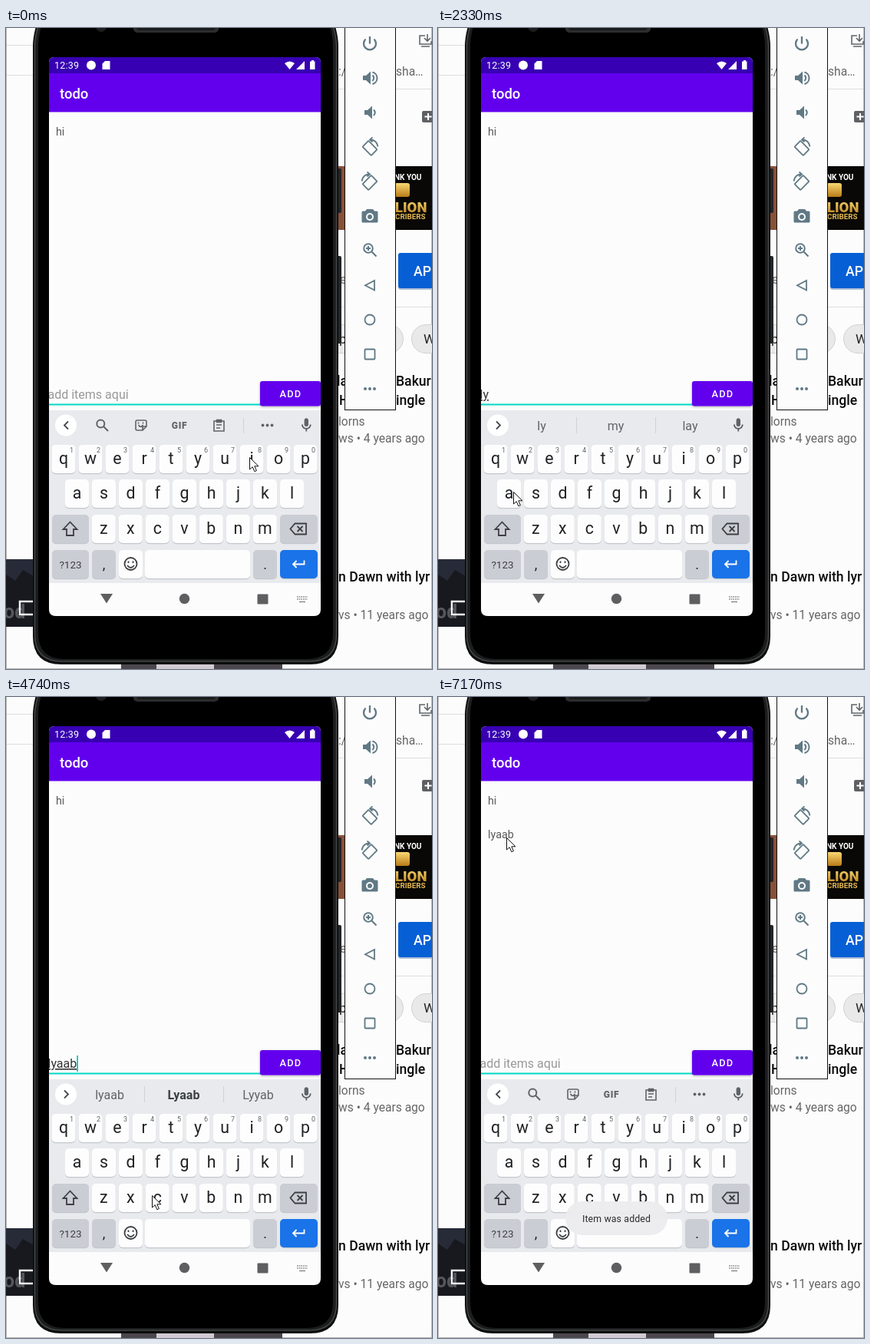
Recreate the animation shown at these times as an HTML page. Size 555x835 px, loop 8 s.

```html
<!DOCTYPE html>
<html lang="en">
<head>
<meta charset="utf-8">
<title>Todo app demo</title>
<style>
html, body { margin: 0; width: 100%; height: 100%; overflow: hidden; background: #fcfcfc; }
svg { display: block; width: 555px; height: 835px; font-family: Roboto, sans-serif; }
.mid { text-anchor: middle; }
.med { font-weight: 500; }
.grey { fill: #666; font-size: 15.6px; }
.title { fill: #0a0a0a; font-size: 17.6px; font-weight: 500; }
.line { fill: none; stroke: currentColor; stroke-width: 2; }
.tools { color: #607985; fill: #607985; }
.strip { color: #5f6368; fill: #5f6368; }
.item { fill: #5a5a5a; font-size: 14.3px; }
</style>
</head>
<body>
<svg viewBox="0 0 555 835">
  <defs>
    <clipPath id="screen"><path d="M56 45q0-7 7-7h340q7 0 7 7v712q0 9-9 9H65q-9 0-9-9z"/></clipPath>
    <linearGradient id="gold" x2="0" y2="1"><stop stop-color="#f8d873"/><stop offset="1" stop-color="#b97c18"/></linearGradient>
    <filter id="soft" x="-30%" y="-30%" width="160%" height="160%"><feDropShadow dx="0" dy="1" stdDeviation="1.5" flood-opacity=".35"/></filter>
  </defs>

  <!-- web page behind the phone -->
  <rect width="555" height="835" fill="#fcfcfc"/>
  <path d="M0 22.5H40M0 61.5H40M430 79.5H555M430 363.5H555" stroke="#dedede"/>
  <path d="M.5 0V835M554.5 0V835M0 834.5H555" stroke="#b5b5b5"/>
  <g fill="none" stroke="#606468" stroke-width="1.6">
    <path d="M546 10h-7v11h15v-4M541 24h11M549 8v9m-4-4l4 4 4-4"/>
  </g>
  <text x="433" y="62" class="grey">:/</text>
  <text x="508" y="62" class="grey">sha…</text>
  <rect x="542" y="108" width="18" height="15" rx="2" fill="#5f6063"/>
  <path d="M550 111v9m-4.500-4.500h9" stroke="#fff" stroke-width="2"/>
  <rect x="430" y="180" width="125" height="83" fill="#090806"/>
  <path d="M430 180h12v83h-12z" fill="#875039"/>
  <g font-weight="700" fill="#fff">
    <text x="506" y="198" font-size="10">NK YOU</text>
    <rect x="506" y="202" width="20" height="18" rx="3" fill="url(#gold)"/>
    <text x="507" y="240" font-size="18.500" font-weight="900" fill="url(#gold)">LION</text>
    <text x="507" y="249" font-size="9.800" fill="#e6b951">CRIBERS</text>
  </g>
  <rect x="511" y="294" width="60" height="47" rx="3" fill="#aebfd8"/>
  <rect x="511" y="293" width="60" height="46" rx="3" fill="#065fd4"/>
  <text x="531" y="323" font-size="17.600" fill="#fff" class="med">AP</text>
  <text x="435" y="333" class="grey">e</text>
  <g fill="#e9e9e9" stroke="#d2d2d2">
    <rect x="400.500" y="386.500" width="117" height="37" rx="18.500"/>
    <rect x="528.500" y="386.500" width="80" height="37" rx="18.500"/>
  </g>
  <text x="434" y="411" font-size="17" fill="#222">p</text>
  <text x="544" y="411" font-size="17" fill="#222">W</text>
  <g class="title">
    <text x="431" y="466">la</text><text x="508" y="466">Bakur</text>
    <text x="434" y="491">H</text><text x="508" y="491">ingle</text>
    <text x="433" y="721">n Dawn with lyr</text>
  </g>
  <g class="grey">
    <text x="433" y="518">lorns</text>
    <text x="433" y="540">ws • 4 years ago</text>
    <text x="433" y="770">vs • 11 years ago</text>
  </g>
  <rect y="692" width="60" height="88" fill="#17191f"/>
  <path d="M0 692h36v22l-14-8-10 14L0 712z" fill="#272b38"/>
  <text x="-3" y="769" font-size="25" font-weight="700" fill="#55575d">od</text>
  <path d="M40 747H18v17h22" fill="none" stroke="#f4f4f4" stroke-width="2.500"/>
  <path d="M150 826h210v9H150z" fill="#4b474c"/>
  <path d="M196 826h75v9h-75z" fill="#d2cad3"/>

  <!-- phone -->
  <g fill="#242526"><rect x="431" y="183" width="6" height="58" rx="2"/><rect x="431" y="297" width="6" height="114" rx="2"/></g>
  <path d="M35 24Q35 10 41-9H427Q433 10 433 24V792q0 37-37 37H72q-37 0-37-37z" fill="#0b0c0c"/>
  <path d="M37.500 24Q37.500 10 44-9H424Q430.500 10 430.500 24V790q0 35-35 35H72.500q-35 0-35-35z" fill="#1c1d1e" stroke="#434546" stroke-width="1.500"/>
  <path d="M42 24Q42 10 48-9H420Q426 10 426 24V788q0 34-34 34H76q-34 0-34-34z" fill="#000"/>
  <rect x="166" y="-8" width="111" height="14" rx="5" fill="#2b2c2e"/>
  <rect x="170" y="-8" width="103" height="11" rx="4" fill="#191a1b"/>
  <circle cx="124" cy="-2" r="7" fill="#1d1e20"/>

  <g clip-path="url(#screen)">
    <rect x="56" y="38" width="354" height="730" fill="#fcfcfc"/>
    <rect x="56" y="38" width="354" height="22" fill="#3700b3"/>
    <rect x="56" y="59" width="354" height="50.500" fill="#6200ee"/>
    <g fill="#fff">
      <text x="63" y="53" font-size="12.500" letter-spacing=".2">12:39</text>
      <circle cx="111" cy="48.500" r="6"/>
      <path d="M129 43h6.500v11h-10v-7.500z"/>
      <path d="M363 46q6.500-5 13 0l-6.500 8zM389 43v11h-11z"/>
      <path d="M397 43.500h1v-1.500h3v1.500h1.500V54H396V43.500z"/>
      <text x="70" y="92" font-size="18.500" class="med">todo</text>
    </g>
    <text x="65" y="140" class="item">hi</text>
    <text x="65" y="184" class="item" id="added">lyaab</text>

    <path d="M56 490.500H332" stroke="#03dac5" stroke-width="2"/>
    <text x="54.500" y="483" font-size="16" fill="#999" id="hint">add items aqui</text>
    <text x="54.500" y="483" font-size="16" fill="#333" id="typed" text-decoration="underline"></text>
    <rect y="467" width="1.700" height="21" fill="#03c4b2" id="caret"/>
    <rect x="331" y="460" width="79" height="32.500" rx="3" fill="#6200ee" filter="url(#soft)"/>
    <text x="371" y="481" font-size="12.800" letter-spacing="1.200" fill="#fff" class="mid med">ADD</text>

    <rect x="56" y="498" width="354" height="225" fill="#e8eaee"/>
    <circle cx="78" cy="517.500" r="14" fill="#fff"/>
    <path id="arrow" fill="none" stroke="#45484d" stroke-width="1.800"/>
    <g class="strip">
      <g id="icons">
        <g class="line"><circle cx="123.300" cy="515.500" r="5"/><path d="M127 519l6 6"/></g>
        <g class="line" style="stroke-width:1.6">
          <path d="M171 511h10q2 0 2 2v6l-5 5h-7q-2 0-2-2v-9q0-2 2-2zM183 519h-3q-2 0-2 2v3M172.500 517q3 5 6 0"/>
          <path d="M172.500 513.500v2m6-2v2"/>
          <path d="M271 512h13v13h-13zM274.500 510.500h6v3h-6zM274 517h7m-7 4h5"/>
        </g>
        <text x="226" y="521.500" class="mid" font-size="12" font-weight="900" letter-spacing=".7">GIF</text>
        <path d="M309.500 508v20" stroke="#d0d2d7"/>
        <circle cx="334.500" cy="517.500" r="1.900"/><circle cx="340.500" cy="517.500" r="1.900"/><circle cx="346.500" cy="517.500" r="1.900"/>
      </g>
      <g id="words" class="mid" font-size="16">
        <path d="M180.500 507v21M283.500 507v21" stroke="#d0d2d7"/>
        <text x="135" y="524"></text><text x="231.500" y="524"></text><text x="328.500" y="524"></text>
      </g>
      <path transform="translate(380.500 506.500) scale(.9)" d="M12 14c1.660 0 3-1.340 3-3V5c0-1.660-1.340-3-3-3S9 3.340 9 5v6c0 1.660 1.340 3 3 3zm5-3c0 2.760-2.240 5-5 5s-5-2.240-5-5H5c0 3.530 2.610 6.430 6 6.920V21h2v-3.080c3.390-.49 6-3.390 6-6.920h-2z"/>
    </g>
    <g id="keys"></g>
    <g fill="none" stroke="#3c4043" stroke-width="1.800">
      <path d="M83.500 643.500l-9 9.500h4.500v8h9v-8h4.500z"/>
      <path d="M376.500 645.500H391v14h-14.500l-6-7zM379.500 649l7 7m0-7l-7 7"/>
      <circle cx="162.500" cy="698" r="8"/><path d="M158 700q4.500 6 9 0M159.500 694.500v2.500m6-2.500v2.500"/>
      <path d="M388.500 693.500v5H374m4.500-4.500l-4.500 4.500 4.500 4.500" stroke="#fff"/>
    </g>
    <g fill="#5f5f61">
      <path d="M123 737h16l-8 12.500z"/><circle cx="232.500" cy="743.500" r="6.700"/><rect x="327.500" y="737.500" width="14" height="13" rx="1"/>
      <path d="M379 741h14M379 744h14" stroke="#8b8b8d" stroke-width="1.700" stroke-dasharray="1.700 1"/>
      <path d="M382 747.500h8" stroke="#8b8b8d" stroke-width="1.700"/>
    </g>
    <g id="popup" filter="url(#soft)">
      <rect x="-17" y="-64" width="35" height="102" rx="5" fill="#cbcdd3"/>
      <text y="-29" class="mid" font-size="25" fill="#202124"></text>
      <text x="9" y="-18" class="mid" font-size="11" fill="#202124">…</text>
    </g>
    <rect id="bubble" x="166" y="657" width="133" height="44" rx="22" fill="#ededef"/>
    <text id="toast" x="232.500" y="683.500" class="mid" font-size="12.300" letter-spacing=".15" fill="#2c2c2c">Item was added</text>
  </g>

  <!-- emulator toolbar -->
  <rect x="441.500" y="-5" width="66" height="502.500" fill="#fcfcfc" stroke="#111"/>
  <g class="tools">
    <g class="line" style="stroke-width:2.3"><path d="M474 11v9.500M468.500 14.500a8 8 0 1 0 11 0"/></g>
    <path d="M465 62h4l6-5.500v17l-6-5.500h-4z"/>
    <g class="line"><path d="M477.500 61.500q3.500 3.500 0 7.500M477.500 57.500a8 8 0 0 1 0 15.500"/></g>
    <path d="M467 107h4l6-5.500v17l-6-5.500h-4z"/>
    <g class="line"><path d="M479 106.500q3.500 3.500 0 7.500"/></g>
    <g id="turn" class="line" style="stroke-width:1.8">
      <rect x="-8" y="-5.500" width="16" height="11" rx="1" transform="translate(474 156.500) rotate(45)"/>
      <path d="M474 145.500q9 0 10.500 9M477.500 142.500l-3.500 3 3.500 3"/>
    </g>
    <use href="#turn" transform="translate(948 45) scale(-1 1)"/>
    <path d="M470 236h8l2 2.500h3q1.500 0 1.500 1.500v12q0 1.500-1.500 1.500h-18q-1.500 0-1.500-1.500v-12q0-1.500 1.500-1.500h3z"/>
    <circle cx="474" cy="246" r="5" fill="#fcfcfc"/><circle cx="474" cy="246" r="3"/>
    <g class="line"><circle cx="472" cy="287" r="5.800"/><path d="M476.500 291.500l6 6M472 284v6m-3-3h6"/></g>
    <g class="line" style="stroke-width:1.8">
      <path d="M480 329v12.500l-12-6.200z"/><circle cx="474" cy="380" r="6.500"/><rect x="467.500" y="418.500" width="13" height="13" rx="1"/>
    </g>
    <circle cx="468" cy="470" r="2"/><circle cx="474" cy="470" r="2"/><circle cx="480" cy="470" r="2"/>
  </g>

  <path id="pointer" d="M.5.5V16l3.700-3.300 2.600 6 2.600-1.100-2.600-5.800H12z" fill="#fff" stroke="#111" stroke-linejoin="round"/>
</svg>
<script>
const LOOP = 8000;
const $ = id => document.getElementById(id);

// Keyboard
function key(x, y, w, label = '', { fill = '#fdfdfd', size = 21.3, ink = '#202124', dy = 25, hint } = {}) {
  return `<rect x="${x}" y="${y + 1.3}" width="${w}" height="37" rx="5" fill="#c3c6cc"/>
    <rect x="${x}" y="${y}" width="${w}" height="37" rx="5" fill="${fill}"/>
    <text x="${x + w / 2}" y="${y + dy}" class="mid" font-size="${size}" fill="${ink}">${label}</text>` +
    (hint ? `<text x="${x + w - 5}" y="${y + 10}" class="mid" font-size="9" fill="#5f6368">${hint}</text>` : '');
}
const row = (letters, x, y, hints = '') =>
  [...letters].map((c, i) => key(x + i * 35, y, 31, c, { hint: hints[i] })).join('');
const dark = '#cbcdd4';
$('keys').innerHTML =
  row('qwertyuiop', 59.5, 543, '1234567890') + row('asdfghjkl', 77, 588) + row('zxcvbnm', 111.8, 634) +
  key(60, 634, 48, '', { fill: dark }) + key(357, 634, 49, '', { fill: dark }) +
  key(60, 680, 48, '?123', { fill: dark, size: 13.5, ink: '#3c4043', dy: 23.5 }) +
  key(112, 680, 31, ',', { fill: dark, size: 18 }) + key(147, 680, 31) + key(181, 680, 137) +
  key(322, 680, 31, '.', { fill: dark, size: 18 }) + key(357, 680, 49, '', { fill: '#1a73e8' });

// Screen updates come in bursts: [first, last, count]
const ticks = [[570, 1490, 8], [1640, 2030, 4], [2330, 2330, 1], [2860, 3840, 7],
  [4000, 4740, 6], [5020, 6010, 8], [6130, 7170, 9]]
  .flatMap(([a, b, n]) => Array.from({ length: n }, (_, i) => Math.round(a + (b - a) * i / Math.max(1, n - 1))));

// Pointer path: [time, x, y]
const path = [[0, 317, 560], [830, 317, 560], [1490, 123, 610], [1640, 123, 606], [1900, 123, 606],
  [2030, 98, 605], [3520, 98, 605], [3840, 179, 644], [4000, 190, 650], [4740, 190, 650],
  [5586, 368, 487], [6130, 368, 487], [7170, 89, 184]];

// Typing: [time, text, suggestions, index of the bold one]
const typing = [[0, ''], [830, 'l', ['l', 'I', 'let']], [1640, 'ly', ['ly', 'my', 'lay']],
  [2860, 'lya', ['lya', 'Lya', 'Lyaab'], 1], [3500, 'lyaa', ['lyaa', 'Lyaab', "Lyaab's"], 1],
  [4400, 'lyaab', ['lyaab', 'Lyaab', 'Lyyab'], 1], [5860, '']];

// Pressed keys: [from, to, letter, x, y]
const presses = [[570, 830, 'i', 320, 543], [1640, 1770, 's', 127, 588], [2860, 3340, 'a', 92, 588],
  [3500, 3670, 'a', 92, 588], [4140, 4440, 'c', 197, 634]];

const carets = [[830, 2330], [4400, 5580]];

const show = (el, on) => el.style.display = on ? '' : 'none';
const lastBefore = (list, t) => list.filter(k => k[0] <= t).pop();
const ramp = (t, a, b) => Math.min(1, Math.max(0, (t - a) / (b - a)));

function pointerAt(t) {
  const a = lastBefore(path, t), b = path[path.indexOf(a) + 1] || a;
  const p = a === b ? 0 : (t - a[0]) / (b[0] - a[0]);
  const e = p * p * (3 - 2 * p);
  return [1, 2].map(i => a[i] + (b[i] - a[i]) * e);
}

function draw(t) {
  const [x, y] = pointerAt(t);
  $('pointer').setAttribute('transform', `translate(${Math.round(x)} ${Math.round(y - 1)})`);

  const [, text, words, bold] = lastBefore(typing, t);
  $('typed').textContent = text;
  show($('hint'), !text);
  show($('icons'), !text);
  show($('words'), text);
  $('arrow').setAttribute('d', text ? 'M76 512.500l5 5-5 5' : 'M81 512.500l-5 5 5 5');
  if (words) $('words').querySelectorAll('text').forEach((el, i) => {
    el.textContent = words[i];
    el.style.fontWeight = i === bold ? 700 : 400;
    el.style.fill = i === bold ? '#3c4043' : '';
  });
  show($('caret'), carets.some(([a, b]) => t >= a && t < b));
  $('caret').setAttribute('x', 54.5 + (text ? $('typed').getComputedTextLength() : 0));

  const press = presses.find(([a, b]) => t >= a && t < b);
  show($('popup'), press);
  if (press) {
    $('popup').setAttribute('transform', `translate(${press[3]} ${press[4]})`);
    $('popup').querySelector('text').textContent = press[2];
  }

  show($('added'), t >= 5860);
  $('toast').style.opacity = ramp(t, 5940, 6280);
  $('bubble').style.opacity = ramp(t, 6080, 6400) * .95;
}

let shown = -1;
function frame(now) {
  const t = now % LOOP;
  const tick = ticks.filter(k => k <= t).pop() || 0;
  if (tick !== shown) draw(shown = tick);
  requestAnimationFrame(frame);
}
draw(0);
requestAnimationFrame(frame);
</script>
</body>
</html>
```
